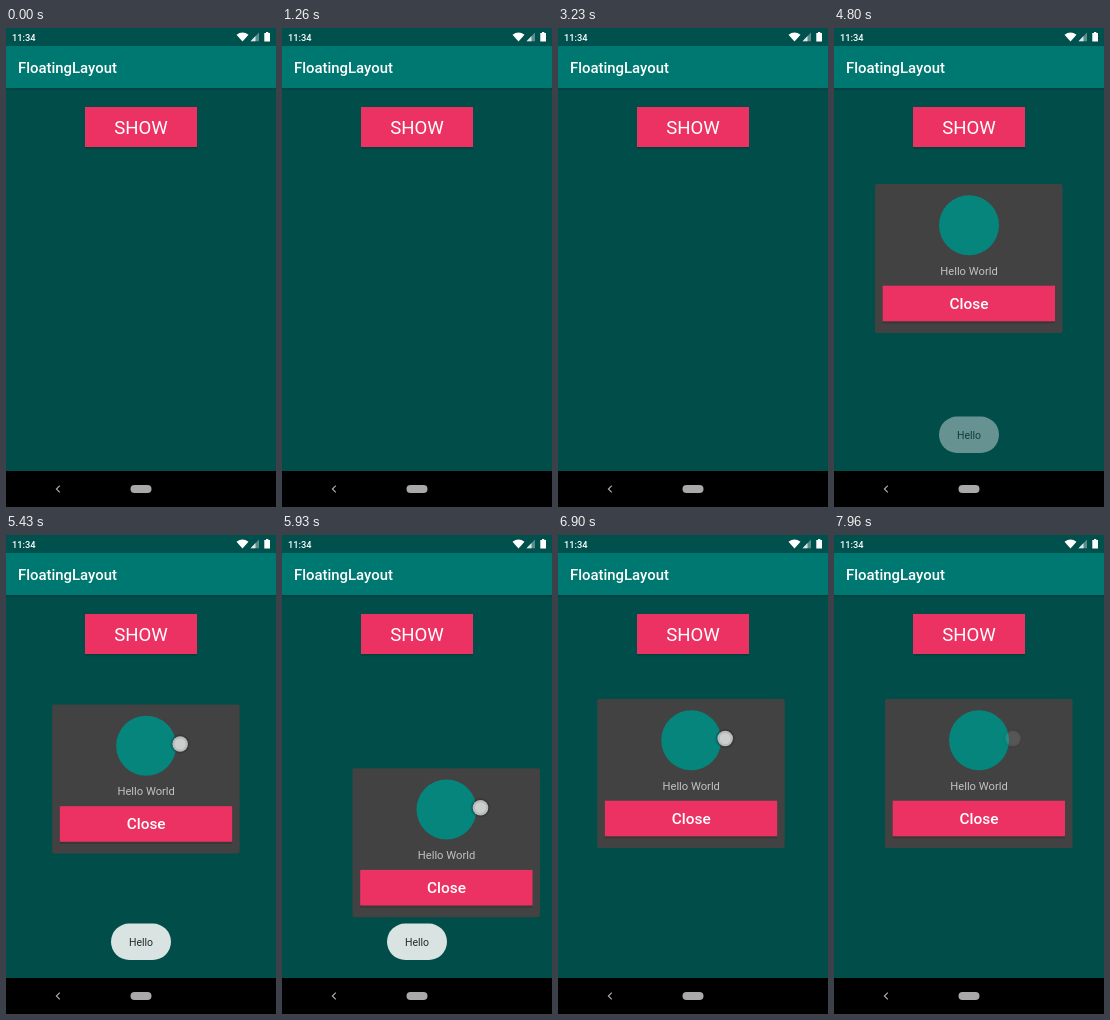
These frames come from a looping animation (270 by 479 pixels, 8000 ms). An HTML page:

```html
<!DOCTYPE html>
<html lang="en">
<head>
<meta charset="utf-8">
<title>FloatingLayout</title>
<style>
  html, body { margin: 0; width: 100%; height: 100%; overflow: hidden; background: #004d4a; }
  svg { display: block; width: 100%; height: 100%; font-family: Roboto, sans-serif; }
  .mid { text-anchor: middle; }
  .medium { font-weight: 500; }
</style>
</head>
<body>
<svg viewBox="0 0 270 479">
  <defs>
    <linearGradient id="drop" x2="0" y2="1">
      <stop stop-color="#002f2d" stop-opacity=".5"/>
      <stop offset="1" stop-color="#002f2d" stop-opacity="0"/>
    </linearGradient>
    <radialGradient id="halo">
      <stop offset=".65" stop-color="#222" stop-opacity=".6"/>
      <stop offset="1" stop-color="#222" stop-opacity="0"/>
    </radialGradient>
  </defs>

  <rect width="270" height="479" fill="#004d4a"/>
  <rect width="270" height="18" fill="#00504d"/>
  <rect y="18" width="270" height="42" fill="#007872"/>
  <rect y="60" width="270" height="3" fill="url(#drop)"/>

  <g fill="#fff">
    <text class="medium" x="6" y="12.5" font-size="9.3">11:34</text>
    <path d="M230.5 6.8Q236.5 2.4 242.5 6.8L236.5 13.5Z"/>
    <path d="M253 4.5V13.3H244.5Z" opacity=".35"/>
    <path d="M249.5 8.1V13.3H244.5Z" opacity=".8"/>
    <path d="M258.3 5H260V4H262.3V5H264V13.5H258.3Z"/>
    <text class="medium" x="12" y="45" font-size="14.9">FloatingLayout</text>
  </g>

  <rect x="79" y="119" width="112" height="3" fill="url(#drop)"/>
  <rect x="79" y="79" width="112" height="40" fill="#ec3163"/>
  <text class="mid" x="135" y="106.3" font-size="18.6" fill="#fff">SHOW</text>

  <rect y="443" width="270" height="36" fill="#000"/>
  <path d="M53.8 457.6L50.4 461L53.8 464.4" fill="none" stroke="#aaa" stroke-width="1.2"/>
  <rect x="124.5" y="457" width="21" height="8" rx="4" fill="#a9a9a9"/>

  <g id="card">
    <rect width="187.5" height="149" rx="2" fill="#424242"/>
    <circle cx="94" cy="41.3" r="30" fill="#05857c"/>
    <text class="mid" x="94" y="91" font-size="11.2" fill="#c2c2c2">Hello World</text>
    <rect x="7.7" y="137" width="172.3" height="2.5" fill="#222" opacity=".3"/>
    <rect x="7.7" y="101.7" width="172.3" height="35.6" fill="#ec3163"/>
    <text class="mid medium" x="94" y="125" font-size="15.4" fill="#fff">Close</text>
  </g>

  <g id="toast">
    <rect x="105" y="388.5" width="60" height="36.5" rx="18.2" fill="#d9e3e1"/>
    <text class="mid" x="135" y="410.8" font-size="10.5" fill="#252b2a">Hello</text>
  </g>

  <g id="touch">
    <circle r="10.5" fill="url(#halo)"/>
    <circle r="7.8" fill="#c4c8c8" opacity=".92"/>
    <circle r="5.5" fill="#d4d6d6" opacity=".7"/>
  </g>
</svg>
<script>
  const LOOP = 8000;
  // Each row: time in ms, then the values at that time.
  const cardPath = [
    [0, 41, 156], [5250, 41, 156], [5930, 70.5, 233.2],
    [6460, 58, 205], [6900, 39.2, 164], [7700, 51, 164], [LOOP, 51, 164]
  ];
  const cardFade = [[0, 0], [4480, 0], [4620, 1], [LOOP, 1]];
  const toastFade = [[0, 0], [4660, 0], [4960, 1], [6480, 1], [6740, 0], [LOOP, 0]];
  const touchFade = [[0, 0], [5150, 0], [5200, 1], [7820, 1], [7985, 0], [LOOP, 0]];

  const linear = p => p;
  const smooth = p => p * p * (3 - 2 * p);

  function sample(track, time, ease = linear) {
    const next = Math.max(1, track.findIndex(row => row[0] >= time));
    const [start, ...from] = track[next - 1];
    const [end, ...to] = track[next];
    const p = ease((time - start) / (end - start));
    return from.map((value, i) => value + (to[i] - value) * p);
  }

  const [card, toast, touch] = ['card', 'toast', 'touch'].map(id => document.getElementById(id));

  function place(node, x, y, opacity) {
    node.setAttribute('transform', `translate(${x} ${y})`);
    node.setAttribute('opacity', opacity);
  }

  function draw(time) {
    const [x, y] = sample(cardPath, time, smooth);
    place(card, x, y, sample(cardFade, time)[0]);
    place(toast, 0, 0, sample(toastFade, time)[0]);
    place(touch, x + 128, y + 39.5, sample(touchFade, time)[0]);
  }

  const origin = performance.now();
  function tick() {
    draw((performance.now() - origin) % LOOP);
    requestAnimationFrame(tick);
  }
  tick();
</script>
</body>
</html>
```
